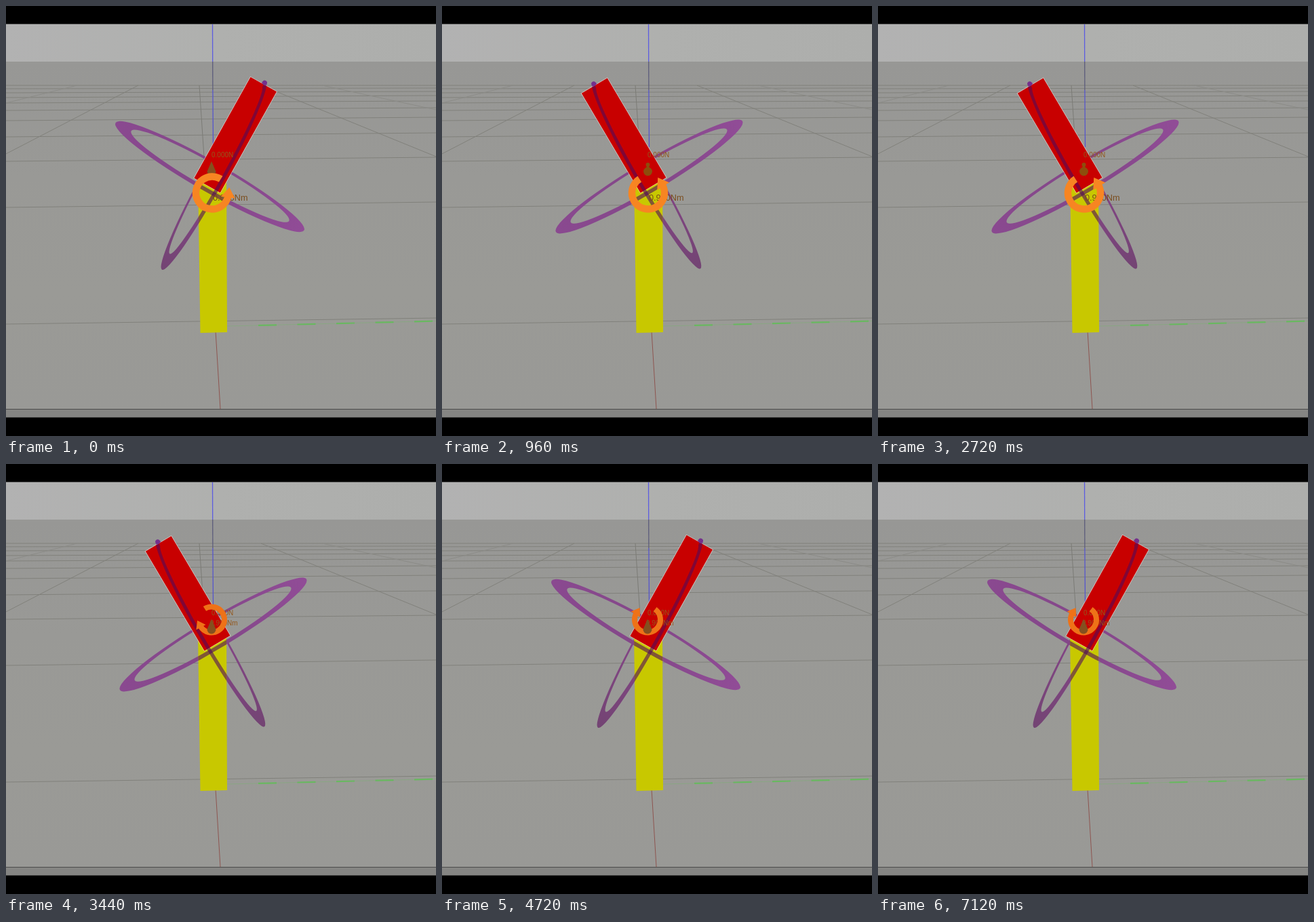
An HTML page with a canvas that plays this animation: 634 by 634 pixels, repeating every 7.2 s.

```html
<!DOCTYPE html>
<html lang="en">
<head>
<meta charset="utf-8">
<title>Joint torque demo</title>
<style>
html, body { margin: 0; width: 100%; height: 100%; overflow: hidden; background: #000; }
canvas { display: block; width: 634px; height: 634px; }
</style>
</head>
<body>
<canvas id="stage" width="634" height="634"></canvas>
<script>
const ctx = document.getElementById('stage').getContext('2d');
const LOOP = 7200, STEP = 80, TAU = Math.PI * 2;
const rad = d => d * Math.PI / 180;

// left and right height of each ground line
const rows = [[117, 117], [122, 121], [128, 126], [135, 132], [143, 140], [154, 150],
  [169, 164], [193, 187], [229, 223], [297, 289], [469, 460]];

// torque marker: start time, centre, radius, line width, arc in degrees, label
const markers = [
  { at: 0, x: 304, y: 275.5, r: 24, w: 10.5, from: 12, to: 302, tip: 8, dir: -1, label: '0.000Nm' },
  { at: 400, x: 304, y: 275.5, r: 24, w: 10.5, from: -30, to: 238, tip: -32, dir: -1, label: '0.900Nm' },
  { at: 2800, x: 303, y: 229.5, r: 19, w: 8, from: -122, to: 150, tip: 152, dir: 1, label: '0.900Nm' },
  { at: 3600, x: 303, y: 229.5, r: 19, w: 8, from: -54, to: 210, tip: 212, dir: 1, label: '0.900Nm' }
];

function line(x1, y1, x2, y2, color, width = 1) {
  ctx.strokeStyle = color;
  ctx.lineWidth = width;
  ctx.beginPath();
  ctx.moveTo(x1, y1);
  ctx.lineTo(x2, y2);
  ctx.stroke();
}

function poly(...pts) {
  const p = new Path2D();
  pts.forEach(([x, y], i) => i ? p.lineTo(x, y) : p.moveTo(x, y));
  p.closePath();
  return p;
}

function fill(path, color, rule = 'nonzero') {
  ctx.fillStyle = color;
  ctx.fill(path, rule);
}

function gradient(x1, y1, x2, y2, ...colors) {
  const g = ctx.createLinearGradient(x1, y1, x2, y2);
  colors.forEach((c, i) => g.addColorStop(i / (colors.length - 1), c));
  return g;
}

function scene() {
  ctx.fillStyle = '#000';
  ctx.fillRect(0, 0, 634, 634);
  ctx.fillStyle = gradient(0, 0, 634, 0, '#b2b2b2', '#afb0ae', '#adaeac');
  ctx.fillRect(0, 26.6, 634, 56);
  ctx.fillStyle = gradient(0, 82, 0, 594, '#979795', '#999996', '#9a9a96', '#999996');
  ctx.fillRect(0, 82, 634, 513);
  ctx.fillStyle = '#858583';
  ctx.fillRect(0, 595, 634, 11.6);
  line(0, 594.5, 634, 594.5, '#4c4c4b');
  for (const [a, b] of rows) line(0, a, 634, b, '#80807b');
  line(105, 117, 0, 143, '#8b8b87');
  line(466, 117, 634, 153, '#8b8b87');
  line(195, 117, 0, 218, '#80807b');
  line(376, 117, 634, 222, '#80807b');
  line(285, 117, 308.5, 471, '#7b7b76');
  line(308.5, 471, 316, 594, '#8e5550');
  line(304.5, 27, 304.7, 82, '#5c5ce0', 1.3);
  line(304.7, 82, 304.9, 124, '#5c5c7c', 1.3);
  line(304.9, 124, 305.5, 208, '#5656cc', 1.3);
  line(326, 472, 634, 464.5, '#89a683');
  for (let x = 372; x < 634; x += 57.5) {
    const y = 472 - (x - 326) * 0.0243;
    line(x, y, x + 27, y - 0.6, '#69b860', 2.2);
  }
}

// 1 = leaning right, -1 = leaning left
function lean(t) {
  const gone = start => Math.min(2, (Math.max(0, t - start) / 320) ** 2);
  return 1 - gone(480) + gone(3680);
}

// flat annulus; the hole is shifted so that the near side looks wider
function ring(a, b, holeA, holeB, dx, dy) {
  const p = new Path2D();
  p.ellipse(0, 0, a, b, 0, 0, TAU);
  p.closePath();
  p.moveTo(holeA + dx, dy);
  p.ellipse(dx, dy, holeA, holeB, 0, 0, TAU);
  return p;
}

function place(x, y, deg, draw) {
  ctx.save();
  ctx.translate(x, y);
  ctx.rotate(rad(deg));
  draw();
  ctx.restore();
}

function discs(p) {
  const b = Math.max(1.5, 16.5 * Math.abs(p));
  const flat = ring(160, 22.5, 134, 17.8, 0, -1);
  const tall = ring(b, 159, Math.max(0.1, b - 3.8), 141, -1.2 * p, -8);
  return {
    flat: draw => place(303 - 2.5 * p, 251.5, -0.5 + 30.2 * p, () => draw(flat)),
    tall: draw => place(304 + 2.5 * p, 249.5, -0.6 + 29.4 * p, () => draw(tall))
  };
}

function armShape(p) {
  const m = new DOMMatrix().translate(303.9, 251.3).rotate(-0.7 + 29.9 * p);
  const box = new Path2D(), path = new Path2D();
  box.rect(-22, -155.5, 44, 170.5);
  path.addPath(box, m);
  return path;
}

function cone(ball) {
  ctx.fillStyle = ball ? '#8d4d0c' : '#84501f';
  ctx.beginPath();
  if (ball) {
    ctx.arc(303.5, 244, 6.5, 0, TAU);
    ctx.rect(301.5, 235, 4, 6);
    ctx.moveTo(306.5, 234);
    ctx.arc(303.5, 234, 3, 0, TAU);
  } else {
    ctx.moveTo(303, 229);
    ctx.lineTo(309.5, 244);
    ctx.arc(303, 244, 6.5, 0, Math.PI);
  }
  ctx.fill();
}

function text(str, x, y, size, color) {
  ctx.font = `${size}px "Liberation Sans", Arial, sans-serif`;
  ctx.fillStyle = color;
  ctx.fillText(str, x, y);
}

function torque(m, big) {
  const color = big ? '#f78522' : '#ee7218';
  ctx.strokeStyle = color;
  ctx.lineWidth = m.w;
  ctx.beginPath();
  ctx.arc(m.x, m.y, m.r, rad(m.from), rad(m.to));
  ctx.stroke();
  place(m.x, m.y, m.tip, () => {
    const h = m.w * 1.1 * m.dir;
    fill(poly([m.r - m.w, -h * 0.3], [m.r + m.w, -h * 0.3], [m.r, h]), color);
  });
}

function draw(t) {
  const p = lean(t);
  const m = markers.filter(k => k.at <= t).pop();
  const big = m.r > 20;
  const { flat, tall } = discs(p);
  const arm = armShape(p);
  const base = poly([283, 252], [325, 252], [326, 481], [286.5, 482]);

  scene();
  flat(d => fill(d, gradient(-160, 0, 160, 0, '#8a4990', '#834788', '#914c97'), 'evenodd'));
  tall(d => fill(d, gradient(0, -159, 0, 159, '#74408c', '#864589', '#734473'), 'evenodd'));
  fill(base, '#c8c800');
  ctx.strokeStyle = 'rgba(255,235,230,.6)';
  ctx.lineWidth = 1.5;
  ctx.stroke(arm);
  fill(arm, '#c80000');

  // near halves of both discs show through the bodies
  ctx.save();
  const bodies = new Path2D();
  bodies.addPath(arm);
  bodies.addPath(base);
  ctx.clip(bodies);
  const near = (x, y, w, h) => d => {
    ctx.beginPath();
    ctx.rect(x, y, w, h);
    ctx.clip();
    fill(d, 'rgba(80,10,90,.6)', 'evenodd');
  };
  flat(near(-170, 0, 340, 30));
  tall(near(p > 0 ? 0 : -30, -170, 30, 340));
  ctx.restore();
  tall(() => {
    ctx.fillStyle = '#74308c';
    ctx.beginPath();
    ctx.arc(0, -155.5, 3.5, 0, TAU);
    ctx.fill();
  });

  cone(big && m.at > 0);
  text('0.000N', 303, 223, 10, '#93581d');
  if (big) text(m.label, 305, 287, 12.7, '#7b4c1c');
  else text(m.label, 301, 238, 10, '#93581d');
  torque(m, big);
  if (!big) cone(false);
}

function tick() {
  const t = performance.now() % LOOP;
  draw(Math.floor(t / STEP) * STEP);
  requestAnimationFrame(tick);
}
tick();
</script>
</body>
</html>
```
